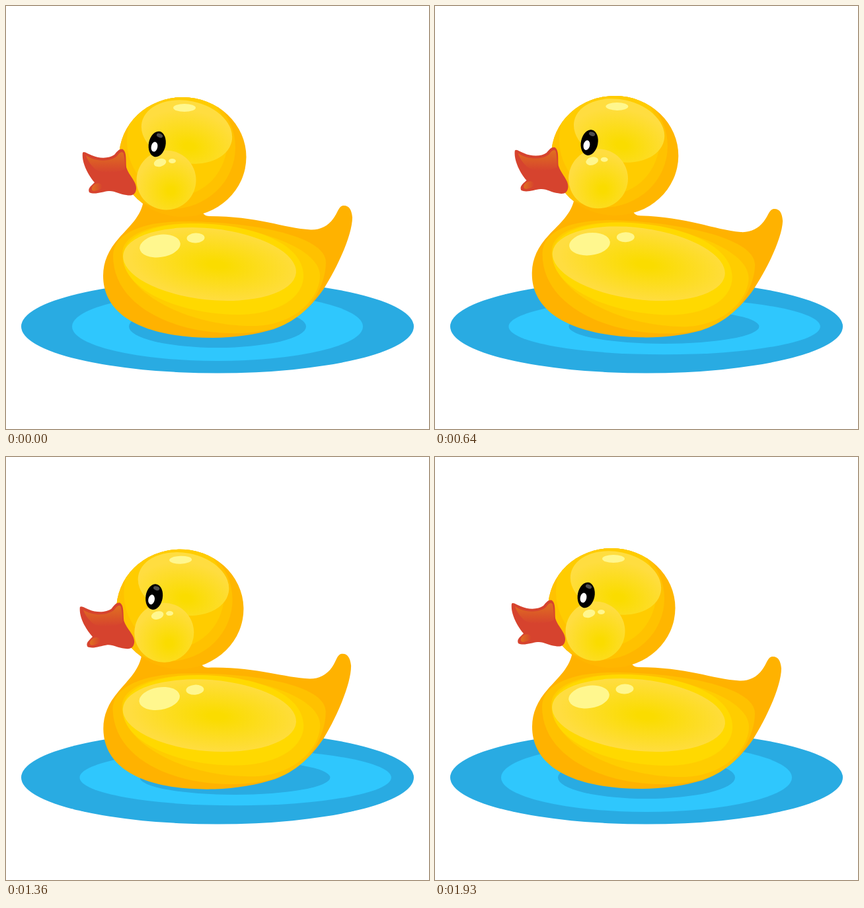
These frames come from a looping animation (640x640 px, 2 s). An HTML page:

```html
<!DOCTYPE html>
<html lang="en">
<head>
<meta charset="utf-8">
<title>Rubber duck</title>
<style>
  html, body { margin: 0; width: 100%; height: 100%; overflow: hidden; background: #fff; }
  svg { display: block; width: 100%; height: 100%; }
</style>
</head>
<body>
<svg viewBox="0 0 640 640">
  <defs>
    <radialGradient id="bodyShine" cx=".54" cy=".5" r=".5">
      <stop offset=".1" stop-color="#fadc00"/>
      <stop offset="1" stop-color="#ffdd40"/>
    </radialGradient>
    <radialGradient id="headShine" cx=".56" cy=".72" r=".58">
      <stop offset=".1" stop-color="#fadc00"/>
      <stop offset="1" stop-color="#ffdd40"/>
    </radialGradient>
    <radialGradient id="cheekShine" cx=".58" cy=".68" r=".6">
      <stop offset=".1" stop-color="#fadc00"/>
      <stop offset="1" stop-color="#ffdd40"/>
    </radialGradient>
    <linearGradient id="beakShine" x1="0" y1="0" x2="0" y2="1">
      <stop offset="0" stop-color="#e07020"/>
      <stop offset="1" stop-color="#d6432e"/>
    </linearGradient>
    <linearGradient id="lipShine">
      <stop offset="0" stop-color="#e07020"/>
      <stop offset="1" stop-color="#d6432e"/>
    </linearGradient>
    <path id="bodyShape" d="M208 294 C205 318 186 334 171 351 C155 369 147 387 147 408
      C147 470 212 502 313 502 C345 502 378 497 405 489 C435 478 458 460 480 429
      C503 393 524 345 524 320 C523 307 518 301 510 302 C503 303 502 313 495 322
      C487 333 475 339 461 338.500 C420 336 380 318 308 318 C302 318 299 315 297 312 L260 270Z"/>
    <ellipse id="headShape" cx="267.300" cy="228.500" rx="96.200" ry="90.500"/>
    <clipPath id="bodyClip"><use href="#bodyShape"/></clipPath>
    <clipPath id="headClip"><use href="#headShape"/></clipPath>
  </defs>

  <ellipse cx="320" cy="485" rx="297" ry="70.500" fill="#29abe2"/>
  <ellipse id="outerRipple" cy="485" fill="#2fc7fd"/>
  <ellipse id="innerRipple" cy="485" fill="#29abe2"/>

  <g id="duck">
    <use href="#bodyShape" fill="#ffb200"/>
    <g clip-path="url(#bodyClip)">
      <path fill="#ffc100" d="M162 378 C162 345 205 326 270 326 C360 326 484 345 484 388
        C484 420 462 460 430 478 C405 492 370 496 335 495 C245 492 162 450 162 378Z"/>
      <path fill="#ffcd00" d="M176 374 C176 348 215 331 270 329 C360 328 475 362 475 408
        C475 440 440 481 380 484 C280 487 176 435 176 374Z"/>
      <path fill="#ffd900" d="M177 380 C177 345 230 328 290 329 C380 331 450 362 450 408
        C450 445 405 467 350 467 C265 467 177 430 177 380Z"/>
    </g>
    <ellipse cx="308" cy="390.500" rx="131.500" ry="54" transform="rotate(6 308 390.500)" fill="url(#bodyShine)"/>
    <g fill="#fff78e">
      <ellipse cx="233" cy="363" rx="31" ry="17" transform="rotate(-8 233 363)"/>
      <ellipse cx="287" cy="351" rx="13.500" ry="7.500" transform="rotate(-3 287 351)"/>
    </g>

    <g id="head">
      <use href="#headShape" fill="#ffb600"/>
      <g clip-path="url(#headClip)">
        <ellipse cx="250" cy="214" rx="97" ry="93" fill="#ffc200"/>
        <ellipse cx="259" cy="204" rx="76" ry="83" fill="#ffcc00"/>
      </g>
      <ellipse cx="273.500" cy="190.500" rx="69.500" ry="47" transform="rotate(12 273.500 190.500)" fill="url(#headShine)"/>
      <circle cx="242.500" cy="263.500" r="45" fill="url(#cheekShine)"/>
      <g fill="#fff78e">
        <ellipse cx="270" cy="154" rx="17" ry="6"/>
        <ellipse cx="233" cy="237" rx="9.500" ry="6" transform="rotate(-15 233 237)"/>
        <ellipse cx="251.500" cy="234.500" rx="5.500" ry="3.500"/>
      </g>
      <ellipse cx="228.700" cy="209" rx="12.800" ry="19.500" transform="rotate(11 228.700 209)"/>
      <ellipse cx="224.500" cy="213" rx="4.800" ry="7.500" transform="rotate(12 224.500 213)" fill="#fff"/>
      <ellipse cx="232.500" cy="196" rx="4.800" ry="3" transform="rotate(20 232.500 196)" fill="#4d4d4d"/>
      <path fill="#d6432e" d="M116 222 C118 219 124 224 130 226 C141 231 156 231 164 225
        C168 220 172 215 177 217 C183 221 181 235 182 244 C186 257 198 266 197 277
        C196 285 191 288 182 286 C172 285 164 279 155 280 C146 281 134 286 126 282
        C123 276 129 272 134 267 C124 256 114 236 116 222Z"/>
      <path fill="url(#beakShine)" d="M121 226 C135 236 158 236 168 227 C172 221 176 219 178 223
        C180 232 180 240 180 247 C165 254 143 254 134 246 C128 240 123 233 121 226Z"/>
      <path fill="url(#lipShine)" d="M130 278 C129 272 135 268 140 268 C148 270 147 276 141 278 C136 280 131 281 130 278Z"/>
    </g>
  </g>
</svg>
<script>
const LOOP = 2000, STEPS = 28, CYCLE = 14;
const byId = id => document.getElementById(id);
const [outer, inner, duck, head] = ["outerRipple", "innerRipple", "duck", "head"].map(byId);

// Eased interpolation through [step, value] keys.
function track(keys, step) {
  const i = Math.max(1, keys.findIndex(([at]) => at >= step));
  const [[t0, a], [t1, b]] = [keys[i - 1], keys[i]];
  const u = (step - t0) / (t1 - t0);
  return a + (b - a) * u * u * (3 - 2 * u);
}

const rocking = [[0, 0], [3.5, -1.85], [10.5, 2.08], [14, 0]];
const nodding = [[0, 0], [7, -2.3], [11, 0], [28, 0]];

function setRipple(el, p, shift, rx, growX, ry, growY) {
  el.setAttribute("cx", 320 + shift * p);
  el.setAttribute("rx", rx + growX * p);
  el.setAttribute("ry", ry + growY * p);
}

function draw(time) {
  let step = Math.floor((time % LOOP) / LOOP * STEPS + 0.07) % STEPS;
  if (step === STEPS - 1) step = 0; // the loop closes on its resting pose
  const phase = step % CYCLE;
  const spread = 1 - Math.abs(phase / 7 - 1);

  setRipple(outer, spread, 38, 220, 22, 52, -13.5);
  setRipple(inner, spread, 37, 134, 14, 32, -8.5);
  duck.setAttribute("transform", `rotate(${track(rocking, phase)} 335 397)`);
  head.setAttribute("transform", `rotate(${track(nodding, step)} 257 229)`);
}

const start = performance.now();
function tick() {
  draw(performance.now() - start);
  requestAnimationFrame(tick);
}
tick();
</script>
</body>
</html>
```
